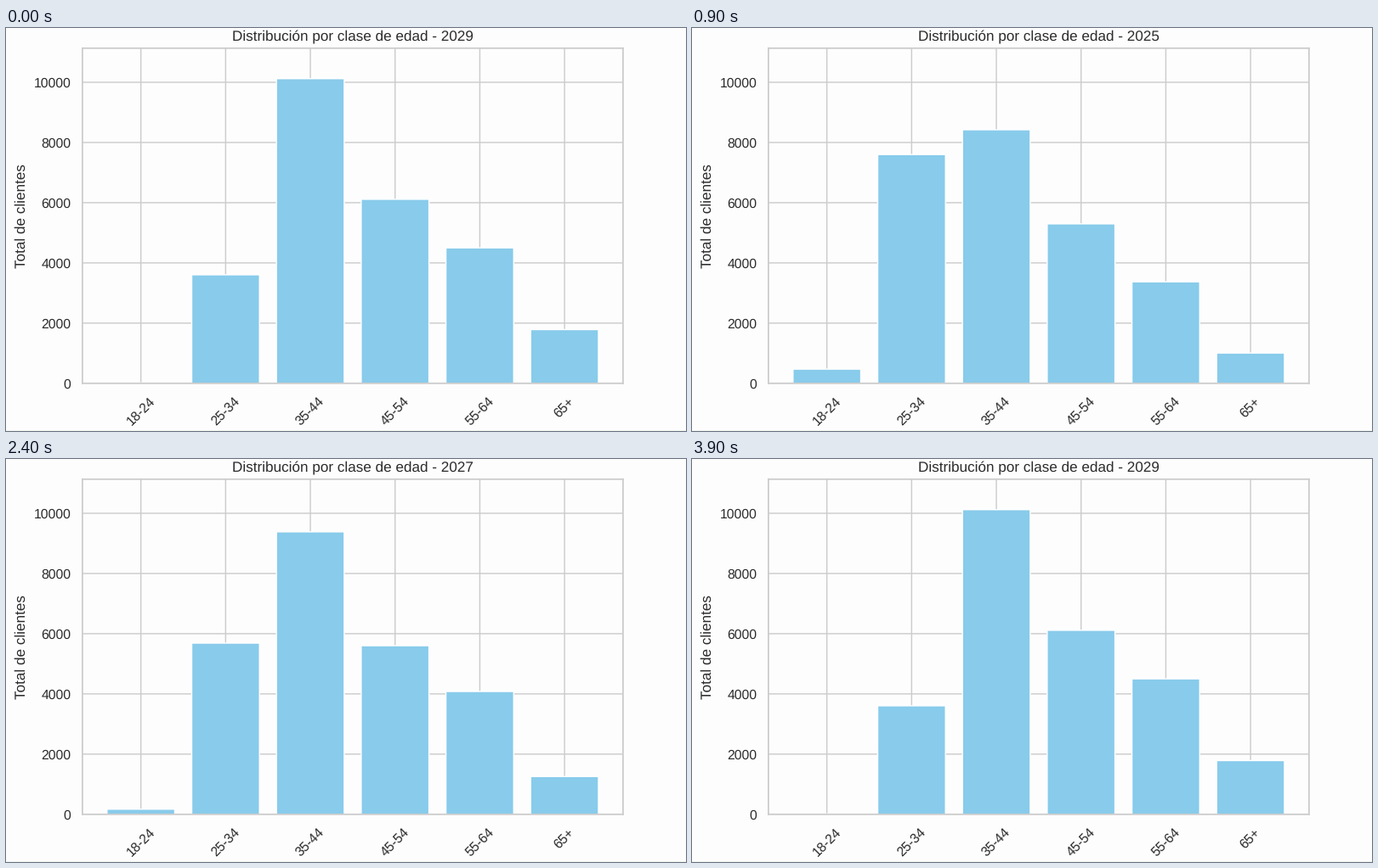
Recreate the animation shown at these times as a matplotlib script. Size 800x475 px, loop 4.6 s.

```python
import matplotlib.pyplot as plt
from matplotlib.animation import FuncAnimation

W, H, DPI = 800, 475, 100
STEP, LOOP = 100, 4600  # ms
LEFT, RIGHT, TOP, BOTTOM = 89.9, 725.9, 23.8, 418.8
PT = 1.43 * 72 / DPI  # one chart point in figure points
PAPER, INK, GRID, BAR = "#fefdfe", "#2b2b2b", "#cccccc", "#88cbeb"

FIRST_YEAR, YEARS = 2024, 6
DELAY, HOLD = 160, 730  # ms before the first year, ms for each year

# Age class: clients in the first year, in the last year, bend between them
TRENDS = {
    "18-24": (675, 15, -450),
    "25-34": (8492, 3605, 530),
    "35-44": (7858, 10120, 700),
    "45-54": (5223, 6113, -650),
    "55-64": (2910, 4500, 900),
    "65+": (985, 1785, -870),
}


def clients(trend, index):
    first, last, bend = trend
    u = index / (YEARS - 1)
    return first + (last - first) * u + bend * u * (1 - u)


def year_index(ms):
    return (ms - DELAY) // HOLD % YEARS


plt.rcParams.update({
    "font.family": "Liberation Sans",
    "path.snap": False,
    "text.hinting": "none",
    "text.color": INK,
    "axes.labelcolor": INK,
})

fig = plt.figure(figsize=(W / DPI, H / DPI), dpi=DPI, facecolor=PAPER)
ax = fig.add_axes([LEFT / W, 1 - BOTTOM / H,
                   (RIGHT - LEFT) / W, (BOTTOM - TOP) / H], facecolor=PAPER)
ax.set_axisbelow(True)
ax.grid(color=GRID, linewidth=PT)
for spine in ax.spines.values():
    spine.set(color=GRID, linewidth=1.25 * PT)

tallest = max(last for _, last, _ in TRENDS.values())
bars = ax.bar(list(TRENDS), tallest, color=BAR, edgecolor="white", linewidth=PT)
ax.set_xlim(-0.69, 5.69)
ax.set_ylim(0, 1.1 * tallest)
ax.set_yticks(range(0, 10001, 2000))
ax.tick_params(length=0, pad=9.5 * PT, labelsize=11 * PT, labelcolor=INK)
ax.tick_params(axis="x", labelrotation=45)
ax.set_ylabel("Total de clientes", fontsize=12 * PT, labelpad=4 * PT)
title = ax.set_title("", fontsize=12 * PT, pad=5.7 * PT)

# Faint rule along the lower edge of the stage
fig.add_artist(plt.Rectangle((0, 0), 1, 1 / H, color="#eef4ec", linewidth=0))


def update(i):
    index = year_index(i * STEP)
    title.set_text(f"Distribución por clase de edad - {FIRST_YEAR + index}")
    for bar, trend in zip(bars, TRENDS.values()):
        bar.set_height(clients(trend, index))
    return [title, *bars]


anim = FuncAnimation(fig, update, frames=LOOP // STEP, interval=STEP,
                     repeat=True, repeat_delay=0)
plt.show()
```
